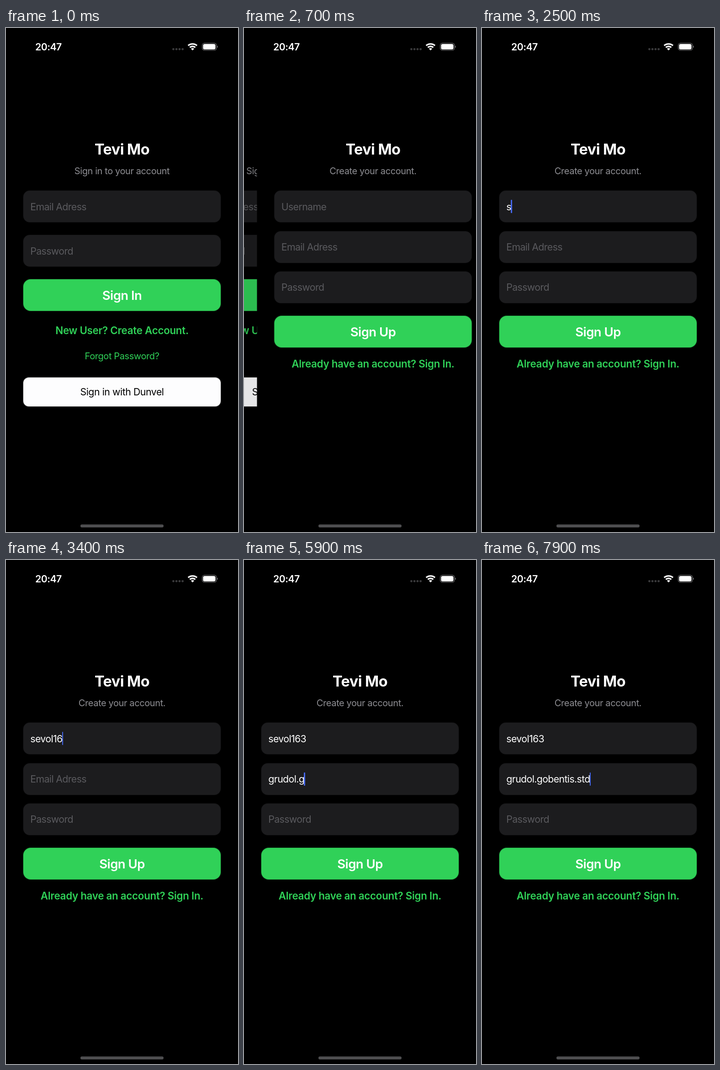
An HTML page that plays this animation: 508 px wide and 1103 px high, repeating every 8000 ms.

```html
<!DOCTYPE html>
<html lang="en">
<head>
<meta charset="utf-8">
<title>Sign up flow</title>
<style>
  html, body { margin: 0; width: 100%; height: 100%; overflow: hidden; background: #000; }
  #stage { position: relative; width: 508px; height: 1103px; overflow: hidden; background: #000;
           font-family: Inter, sans-serif; color: #fff; }
  .page, .dim, svg { position: absolute; left: 0; top: 0; width: 508px; height: 1103px; }
  .page { background: #000; }
  .dim { background: #000; opacity: 0; }

  /* Each line of text is centred on its --y */
  .line { position: absolute; left: 0; width: 508px; top: calc(var(--y) * 1px - 20px);
          line-height: 40px; text-align: center; white-space: pre; }
  .title { font-size: 32.5px; font-weight: 700; letter-spacing: -.6px; }
  .sub { font-size: 20.05px; letter-spacing: -.42px; color: #8e8e93; }
  .link { font-size: 22.4px; font-weight: 600; letter-spacing: -.3px; color: #30d158; }
  .small { font-size: 20.05px; letter-spacing: -.42px; color: #30d158; }

  /* The faint ring softens the box edges */
  .box { position: absolute; left: 38px; top: calc(var(--y) * 1px); width: 432px; height: 69px;
         box-sizing: border-box; display: flex; align-items: center; white-space: pre;
         background: var(--fill);
         box-shadow: 0 0 0 1px color-mix(in srgb, var(--fill) 30%, transparent); }
  .field { --fill: #1c1c1e; border-radius: 14px; padding-left: 15.3px;
           font-size: 21.3px; letter-spacing: -.62px; }
  .hint { color: #5a5a5e; }
  .caret { width: 2.5px; height: 29px; margin-right: -2.5px; border-radius: 1px;
           background: #4566e8; opacity: 0; position: relative; z-index: 1; }
  .button { --fill: #30d158; border-radius: 16px; justify-content: center;
            font-size: 27.6px; font-weight: 600; letter-spacing: -.6px; }
  .light { --fill: #fdfdfe; height: 62.5px; border-radius: 12px; color: #000;
           font-size: 21.3px; font-weight: 400; letter-spacing: -.45px; }
  .clock { position: absolute; left: 64px; top: 21px; line-height: 40px;
           font-size: 21.2px; font-weight: 600; letter-spacing: -.5px; }
</style>
</head>
<body>
<div id="stage">
  <div class="page" id="login">
    <div class="line title" style="--y:266">Tevi Mo</div>
    <div class="line sub" style="--y:313">Sign in to your account</div>
    <div class="box field" style="--y:356"><span class="hint">Email Adress</span></div>
    <div class="box field" style="--y:453.3"><span class="hint">Password</span></div>
    <div class="box button" style="--y:550.3">Sign In</div>
    <div class="line link" style="--y:661.5">New User? Create Account.</div>
    <div class="line small" style="--y:718.3">Forgot Password?</div>
    <div class="box button light" style="--y:765">Sign in with Dunvel</div>
    <div class="dim" id="dim"></div>
  </div>

  <div class="page" id="signup">
    <div class="line title" style="--y:266">Tevi Mo</div>
    <div class="line sub" style="--y:313">Create your account.</div>
    <div class="box field" id="user" style="--y:356"><span class="value"></span><i class="caret"></i><span class="hint">Username</span></div>
    <div class="box field" id="mail" style="--y:444.5"><span class="value"></span><i class="caret"></i><span class="hint">Email Adress</span></div>
    <div class="box field" style="--y:532.7"><span class="hint">Password</span></div>
    <div class="box button" style="--y:630">Sign Up</div>
    <div class="line link" style="--y:735.3">Already have an account? Sign In.</div>
  </div>

  <div class="clock">20:47</div>
  <svg viewBox="0 0 508 1103">
    <g fill="#3b3b3d">
      <circle cx="366.5" cy="46.3" r="2.4"/><circle cx="373.2" cy="46.3" r="2.4"/>
      <circle cx="380" cy="46.3" r="2.4"/><circle cx="386.7" cy="46.3" r="2.4"/>
    </g>
    <g fill="none" stroke="#fff" stroke-width="3.4">
      <path d="M398.9 38.6A14.3 14.3 0 0 1 418.1 38.6"/>
      <path d="M402.5 42.6A9 9 0 0 1 414.5 42.6"/>
    </g>
    <path d="M408.5 49L405 45.4A5 5 0 0 1 412 45.4Z" fill="#fff"/>
    <rect x="429.6" y="33.2" width="31.4" height="15.6" rx="5" fill="none" stroke="#6c6c6e" stroke-width="1.3"/>
    <rect x="431.5" y="35.1" width="27.2" height="11.8" rx="3.5" fill="#fff"/>
    <path d="M462.2 38.6Q464 39.4 464 41T462.2 43.4Z" fill="#6c6c6e"/>
    <rect x="163" y="1086.5" width="182" height="6.5" rx="3.2" fill="#4e4e50"/>
  </svg>
</div>
<script>
const LOOP = 8000, STEP = 100, WIDTH = 508;
const PUSH_START = 449.7, PUSH_RATE = 0.0184, PARALLAX = 0.302;
const $ = id => document.getElementById(id);

// Each entry of keys is the time at which one more letter appears
const inputs = [
  { box: $('user'), text: 'sevol163', focus: 1700, blur: 4200,
    keys: [2400, 2700, 2900, 3100, 3100, 3200, 3400, 3600] },
  { box: $('mail'), text: 'grudol.gobentis.std', focus: 4200, blur: LOOP,
    keys: [4700, 4800, 4900, 5000, 5200, 5400, 5600, 5900, 6000, 6100,
           6300, 6400, 6500, 6700, 6900, 7100, 7400, 7700, 7900] }
];

// Critically damped spring from 1 to 0
function spring(ms) {
  const u = Math.max(0, ms) * PUSH_RATE;
  return (1 + u) * Math.exp(-u);
}

function drawPush(t) {
  const left = t < 1000 ? spring(t - PUSH_START) : 0;
  const shown = 1 - left;
  $('signup').style.transform = `translateX(${WIDTH * left}px)`;
  $('login').style.transform = `translateX(${-WIDTH * PARALLAX * shown}px)`;
  $('dim').style.opacity = 0.1 * shown;
}

function drawInput({ box, text, focus, blur, keys }, t) {
  const count = keys.filter(k => k <= t).length;
  const [value, caret, hint] = box.children;
  value.textContent = text.slice(0, count);
  hint.style.display = count ? 'none' : '';
  caret.style.marginLeft = count ? '-.8px' : '0';
  const active = t >= focus && t < blur;
  caret.style.opacity = active ? Math.min(1, (t - focus + STEP) / (2 * STEP)) : 0;
}

const start = performance.now();
function frame() {
  const now = Math.max(0, performance.now() - start) % LOOP;
  const t = Math.floor(now / STEP) * STEP;
  drawPush(t);
  inputs.forEach(input => drawInput(input, t));
  requestAnimationFrame(frame);
}
frame();
</script>
</body>
</html>
```
